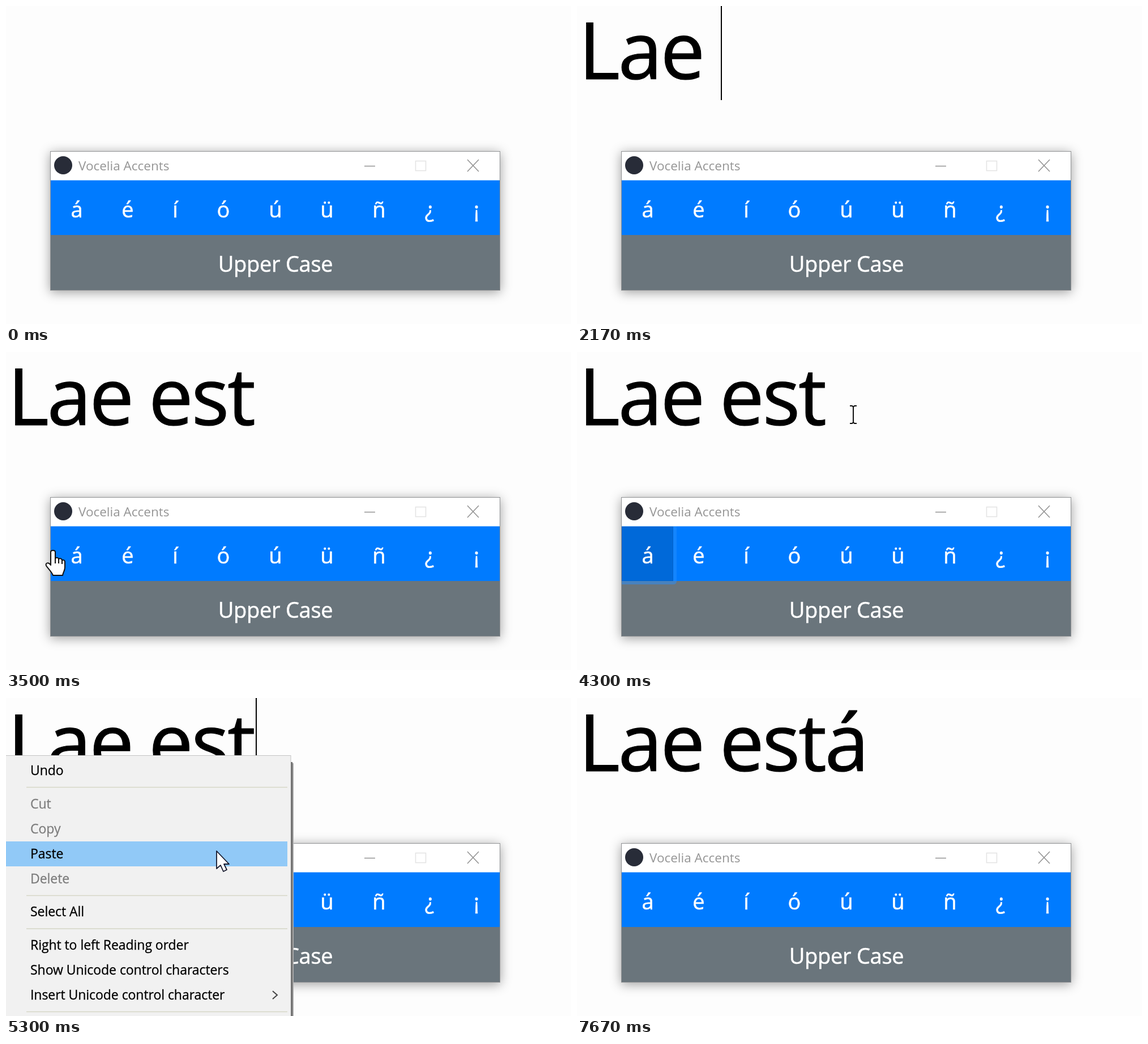
An HTML page that plays this animation: 998 by 561 pixels, repeating every 7710 ms.

```html
<!DOCTYPE html>
<html lang="en">
<head>
<meta charset="utf-8">
<title>Accent picker</title>
<style>
  html, body { margin: 0; width: 100%; height: 100%; overflow: hidden; background: #fdfdfd; }
  svg { display: block; width: 998px; height: 561px; font-family: "Open Sans", "Noto Sans", sans-serif; }
  text { white-space: pre; }
  .big { font-size: 140px; letter-spacing: -3px; stroke: #000; stroke-width: 1.2px; }
  .label { font-size: 38px; fill: #fff; stroke: #fff; stroke-width: .6px; text-anchor: middle; }
  .window { filter: drop-shadow(0 3px 10px rgba(0, 0, 0, .38)); }
  #rows { font-size: 23px; letter-spacing: -.05px; stroke-width: .3px; }
</style>
</head>
<body>
<svg viewBox="0 0 998 561">
  <rect width="998" height="561" fill="#fdfdfd"/>
  <text id="name" class="big" x="3" y="128.5"></text>
  <text id="word" class="big" x="252" y="128.5"></text>
  <rect id="caret" width="2" height="166"/>

  <rect class="window" x="78.5" y="256.5" width="794" height="245" fill="#fff" stroke="#909294"/>
  <circle cx="101" cy="281" r="16" fill="#282c38"/>
  <text x="128" y="290" font-size="22.5" fill="#959595">Vocelia Accents</text>
  <g fill="none" stroke="#939393" stroke-width="1.6">
    <path d="M633 282.5H652M815 271L835 292M835 271L815 292"/>
    <rect x="723.5" y="273.5" width="18" height="17" stroke="#e4e4e4"/>
  </g>
  <rect x="79" y="307.5" width="793" height="97" fill="#007bff"/>
  <rect x="79" y="404" width="793" height="97" fill="#6a757c"/>
  <path id="ring" d="M170 308H176V404Q176 410 170 410H79V404H170Z" fill="#268fff"/>
  <rect id="pressed" x="79.5" y="308.5" width="90" height="95" fill="#0069d9" stroke="#0062cc"/>
  <g id="letters"></g>
  <text class="label" x="476" y="469" letter-spacing="-.3">Upper Case</text>

  <g id="menu">
    <path d="M504 113V561" stroke="#666" stroke-width="4"/>
    <path d="M507 115V561" stroke="#aaa" stroke-width="2"/>
    <rect x="-2" y="101.5" width="505" height="470" fill="#f1f1f1" stroke="#c4c4c4"/>
    <rect id="mark" width="497" height="44" fill="#91c9f7"/>
    <path d="M36 157.5H497M36 348.5H497M36 407H497M36 553.5H497" stroke="#d5d6c6" stroke-width="1.5"/>
    <g id="rows"></g>
    <path d="M471 517L479 524L471 531" fill="none" stroke="#444" stroke-width="2"/>
  </g>

  <g id="pointer" stroke-linejoin="round">
    <g id="arrow"><path d="M0 0V31L7 25L12 36L18 33L13 23H22Z" fill="#fff" stroke="#15182c" stroke-width="1.8"/></g>
    <g id="hand" stroke="#111" stroke-width="2">
      <path fill="#fff" d="M-4 3C-4-1 4-1 4 3V15C5 12 10 12 10 16C11 13 16 14 16 18C17 16 21 17 21 20V30C21 36 18 38 17 44H0C-2 38-8 33-12 27C-14 22-8 20-4 26Z"/>
      <path d="M4 15V23M10 16V23M16 18V24"/>
    </g>
    <g id="beam"><path d="M-6-16H-2L0-14L2-16H6M0-14V13M-6 15H-2L0 13L2 15H6" fill="none" stroke="#111" stroke-width="2"/></g>
  </g>
</svg>
<script>
const LOOP = 7710, BLINK = 530;
const PRESS = 3640, MENU = 4560, PASTE = 5560;
const $ = id => document.getElementById(id);
const show = (id, on) => $(id).style.display = on ? "" : "none";
const clamp = v => Math.max(0, Math.min(1, v));

function addText(parent, content, attrs) {
  const el = document.createElementNS("http://www.w3.org/2000/svg", "text");
  for (const key in attrs) el.setAttribute(key, attrs[key]);
  el.textContent = content;
  $(parent).append(el);
}

const centers = [125, 215, 299, 384, 476, 567, 659, 748, 831];
[..."áéíóúüñ¿¡"].forEach((c, i) => addText("letters", c, { class: "label", x: centers[i], y: 373 }));

// label, vertical centre, enabled
const rows = [
  ["Undo", 128, 1], ["Cut", 187, 0], ["Copy", 231, 0], ["Paste", 275, 1], ["Delete", 319, 0],
  ["Select All", 377, 1], ["Right to left Reading order", 436, 1],
  ["Show Unicode control characters", 480, 1], ["Insert Unicode control character", 524, 1]
];
for (const [label, y, enabled] of rows) {
  const color = enabled ? "#000" : "#7d7d7d";
  addText("rows", label, { x: 43, y: y + 8, fill: color, stroke: color });
}

// time, name, word, caret x
const typing = [
  [0, "", "", 12], [480, "L", "", 73], [640, "La", "", 148], [800, "Lae", "", 223],
  [1070, "Lae", "", 254], [2270, "Lae", "e", 327], [2430, "Lae", "es", 391],
  [2600, "Lae", "est", 441], [PASTE, "Lae", "está", 516]
];

// time, x, y, linear approach
const path = [
  [3060, 66, 580], [3500, 83, 350], [3600, 112, 362], [3760, 115, 362],
  [4300, 488, 111], [4500, 503, 104], [4800, 503, 104], [5250, 372, 270],
  [5540, 372, 270], [6000, 532, 246, 1], [6300, 1010, 190, 1]
];

function pointerAt(t) {
  const i = path.findIndex(p => p[0] > t);
  if (i < 1) return null;
  const [t0, x0, y0] = path[i - 1], [t1, x1, y1, linear] = path[i];
  let k = (t - t0) / (t1 - t0);
  if (!linear) k = k * k * (3 - 2 * k);
  return [x0 + (x1 - x0) * k, y0 + (y1 - y0) * k].map(Math.round);
}

function caretOn(t, typed) {
  if (t < 270 || t >= PRESS && t < MENU) return false;
  if (t >= MENU && t < PASTE) return true;
  return Math.floor((t - Math.max(270, typed)) / BLINK) % 2 === 0;
}

function draw(t) {
  const [typed, name, word, x] = typing.filter(s => s[0] <= t).pop();
  $("name").textContent = name;
  $("word").textContent = word;
  $("caret").setAttribute("x", x);
  show("caret", caretOn(t, typed));

  const focused = t < MENU;
  show("pressed", focused && t > 3520);
  $("pressed").style.opacity = clamp((t - 3520) / 150);
  show("ring", focused && t >= PRESS);
  $("ring").style.opacity = .5 * clamp((t - PRESS) / 150);

  const menuOpen = t >= MENU && t < PASTE;
  show("menu", menuOpen);
  $("menu").style.opacity = clamp((t - MENU + 40) / 160);

  const pos = pointerAt(t);
  show("pointer", pos);
  if (!pos) return;
  const [px, py] = pos;
  $("pointer").setAttribute("transform", `translate(${px} ${py})`);
  const inWindow = px > 79 && px < 872 && py > 256 && py < 501;
  const kind = menuOpen || inWindow && py < 308 ? "arrow" : inWindow ? "hand" : "beam";
  for (const id of ["arrow", "hand", "beam"]) show(id, id === kind);

  const row = px < 497 && rows.find(r => Math.abs(r[1] - py) <= 22);
  show("mark", row);
  if (row) $("mark").setAttribute("y", row[1] - 22);
}

const start = performance.now();
function tick() {
  draw((performance.now() - start) % LOOP);
  requestAnimationFrame(tick);
}
tick();
</script>
</body>
</html>
```
